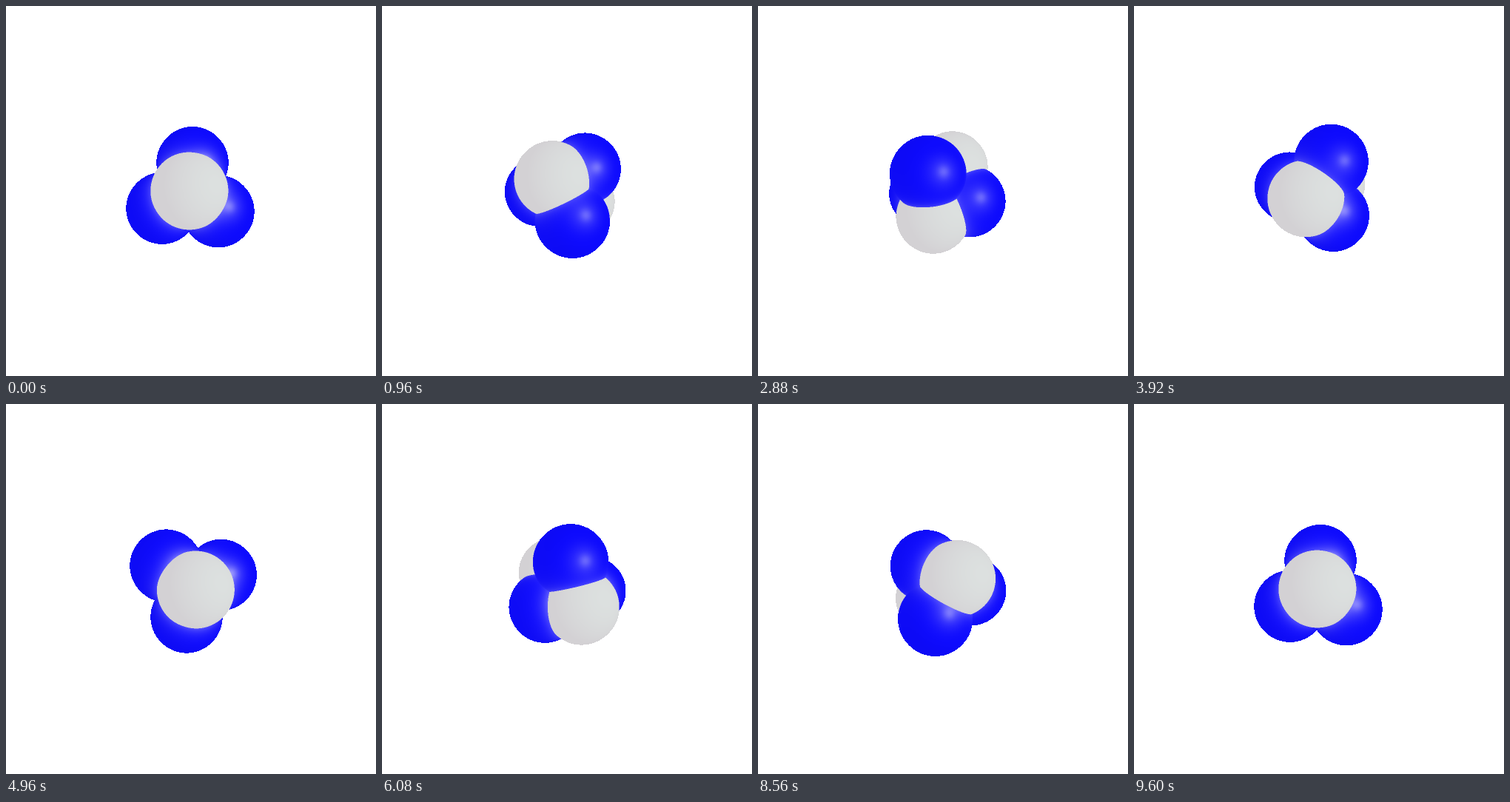
Write an HTML page with a canvas that moves like this. It is 500 by 500 pixels and loops after 9.68 s.

```html
<!DOCTYPE html>
<html lang="en">
<head>
<meta charset="utf-8">
<title>Tumbling cluster of five spheres</title>
<style>
  html, body { margin: 0; width: 100%; height: 100%; overflow: hidden; background: #fff; }
  canvas { display: block; width: 500px; height: 500px; }
</style>
</head>
<body>
<canvas id="stage" width="500" height="500"></canvas>
<script>
const STEP = 80, STEPS = 121;
const CENTER = 250, LEFT = 150, SIZE = 200;
const CAMERA = 570;
const BLUE_R = 48.3, WHITE_R = 48.8;
const LIGHT = [170, 39, 232];
const SUB = [0.25, 0.75];

// Three blue spheres around the waist, two white ones at the poles.
const BODY = [
  { pos: [0, 38, 0], white: false },
  { pos: [-37.7, -25.2, 0], white: false },
  { pos: [37.7, -25.2, 0], white: false },
  { pos: [0, 0, 38], white: true },
  { pos: [0, 0, -38], white: true }
];

const ctx = document.getElementById('stage').getContext('2d');
const image = ctx.createImageData(SIZE, SIZE);
const rgb = [0, 0, 0];

// Turn about the vertical axis, then about the line of sight, by the same angle.
function rotate([x, y, z], a) {
  const c = Math.cos(a), s = Math.sin(a);
  const u = x * c - z * s;
  return [u * c + y * s, y * c - u * s, x * s + z * c];
}

function shade(x, y, z, ball, whites) {
  const [cx, cy, cz] = ball.pos;
  const nx = (x - cx) / ball.r, ny = (y - cy) / ball.r, nz = (z - cz) / ball.r;
  let lx = LIGHT[0] - x, ly = LIGHT[1] - y, lz = LIGHT[2] - z;
  const ll = Math.hypot(lx, ly, lz);
  lx /= ll; ly /= ll; lz /= ll;
  const diffuse = Math.max(0, nx * lx + ny * ly + nz * lz);

  if (ball.white) {
    rgb[0] += 211 + 9 * diffuse;
    rgb[1] += 209 + 15 * diffuse;
    rgb[2] += 212 + 11 * diffuse;
    return;
  }

  const vl = Math.hypot(x, y, CAMERA - z);
  const hx = lx - x / vl, hy = ly - y / vl, hz = lz + (CAMERA - z) / vl;
  const facing = Math.max(0, (nx * hx + ny * hy + nz * hz) / Math.hypot(hx, hy, hz));
  const shine = 45 * Math.pow(facing, 10) + 45 * Math.pow(facing, 60);
  let glow = 0;
  for (const w of whites) {
    const gap = Math.hypot(x - w.pos[0], y - w.pos[1], z - w.pos[2]) - w.r;
    glow += 55 * Math.exp(-Math.max(0, gap) / 8);
  }
  rgb[0] += 13 + shine + glow;
  rgb[1] += 10 + shine + glow;
  rgb[2] += 246 + 7 * Math.min(1, diffuse * 2);
}

// Adds the colour seen along one ray; returns 1 on a hit.
function trace(px, py, balls, whites) {
  const len = Math.hypot(px, py, CAMERA);
  const dx = px / len, dy = py / len, dz = -CAMERA / len;
  let near = Infinity, hit = null;
  for (const ball of balls) {
    const [cx, cy, cz] = ball.pos;
    const b = dx * cx + dy * cy + dz * (cz - CAMERA);
    const disc = b * b - ball.k;
    if (disc < 0) continue;
    const t = b - Math.sqrt(disc);
    if (t < near) { near = t; hit = ball; }
  }
  if (!hit) return 0;
  shade(dx * near, dy * near, CAMERA + dz * near, hit, whites);
  return 1;
}

function draw(step) {
  const angle = (step + 1) * 3 * Math.PI / 180;
  const balls = BODY.map(({ pos, white }) => {
    const p = rotate(pos, angle);
    const r = white ? WHITE_R : BLUE_R;
    const k = p[0] ** 2 + p[1] ** 2 + (p[2] - CAMERA) ** 2 - r * r;
    return { pos: p, white, r, k };
  });
  const whites = balls.filter(b => b.white);
  const data = image.data;
  let i = 0;
  for (let row = 0; row < SIZE; row++) {
    for (let col = 0; col < SIZE; col++, i += 4) {
      let hits = 0;
      rgb.fill(0);
      for (const sy of SUB) {
        for (const sx of SUB) {
          hits += trace(LEFT + col + sx - CENTER, CENTER - LEFT - row - sy, balls, whites);
        }
      }
      // The outline stays crisp; only inner edges are blended.
      for (let c = 0; c < 3; c++) data[i + c] = hits > 1 ? rgb[c] / hits : 255;
      data[i + 3] = 255;
    }
  }
  ctx.putImageData(image, LEFT, LEFT);
}

const start = performance.now();
let shown = -1;

function tick() {
  const step = Math.floor((performance.now() - start) / STEP) % STEPS;
  if (step !== shown) {
    shown = step;
    draw(step);
  }
  requestAnimationFrame(tick);
}

tick();
</script>
</body>
</html>
```
